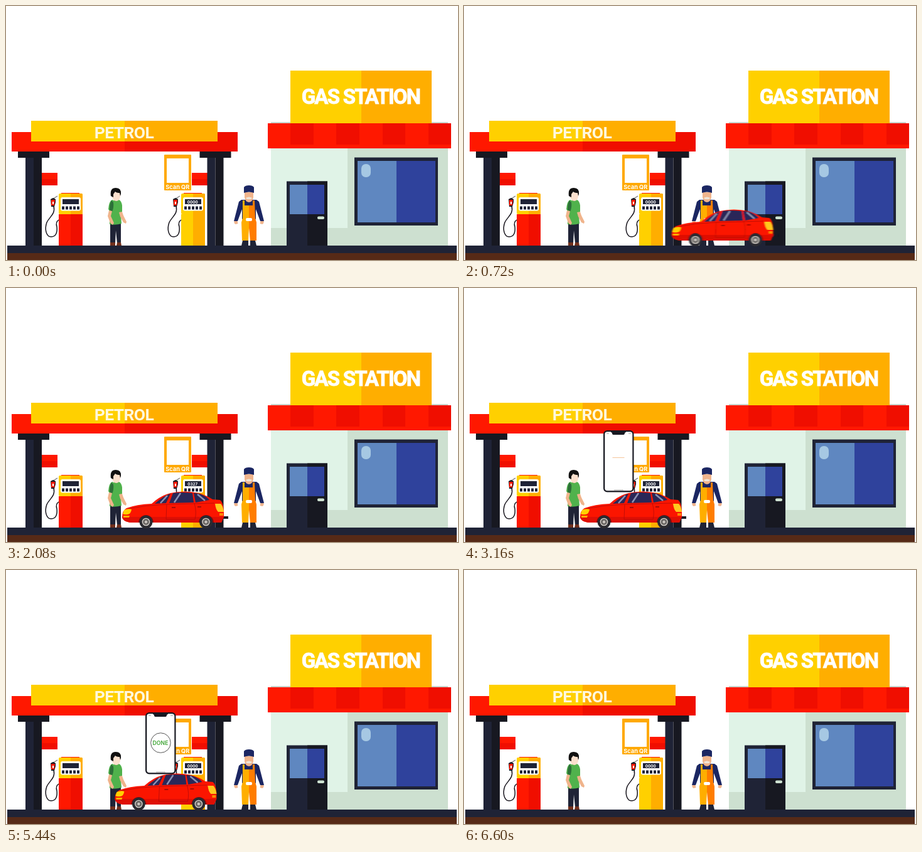
Animation of 720 by 405 pixels, one loop 7 s. Source, as an HTML page:

```html
<!DOCTYPE html>
<html lang="en">
<head>
<meta charset="utf-8">
<title>Gas station</title>
<style>
  html, body { margin: 0; width: 100%; height: 100%; overflow: hidden; background: #fff; }
  svg { display: block; width: 720px; height: 405px; }
  .y { fill: #ffd000 } .o { fill: #ffae00 } .r { fill: #ff1800 } .d { fill: #f00e00 }
  .n { fill: #1f2336 } .k { fill: #171821 } .w { fill: #fff }
  .sky { fill: #5f87c0 } .deep { fill: #2f429c } .skin { fill: #f0b48c } .navy { fill: #1b2662 }
  .sign { font-family: Roboto, sans-serif; font-weight: 700 }
  .small { font-family: Inter, sans-serif; font-weight: 700 }
</style>
</head>
<body>
<svg viewBox="0 0 720 405">
  <defs>
    <filter id="blur" filterUnits="userSpaceOnUse" x="-200" y="310" width="570" height="90">
      <feGaussianBlur id="smear" stdDeviation="0 0"/>
    </filter>

    <g id="post">
      <path class="n" d="M31 240h13v142h-13z"/>
      <path class="k" d="M19 232h50v10h-50zM44 242h13v140h-13z"/>
    </g>
    <g id="bar">
      <path class="r" d="M57 266h25v10h-25z"/>
      <path class="d" d="M57 276h25v10h-25z"/>
    </g>

    <g id="head">
      <path class="r" d="M88 298h29v3h-29z"/>
      <rect class="y" x="84" y="299" width="38" height="33" rx="2"/>
      <path class="o" d="M103 299h17q2 0 2 2v31h-19z"/>
      <rect class="w" x="87" y="305" width="32" height="21.5" rx="3"/>
      <path class="n" d="M90 308h26v8h-26z"/>
      <path d="M89 322h28" stroke="#1f2336" stroke-width="5" stroke-dasharray="4 2"/>
      <path d="M76 319C79 332 70 335 65 345C61 356 64 368 72 368C80 368 82 360 81 352C79 346 81 343 84 341" fill="none" stroke="#17141c" stroke-width="1.5"/>
      <path d="M74 308l8-5" stroke="#777" stroke-width="1.3"/>
      <path class="k" d="M71 308l4-2 4 2v5l-2 7h-5z"/>
      <path class="r" d="M72 309h6l-1 9h-5z"/>
      <path class="w" d="M74 312h2v4h-2z"/>
    </g>

    <g id="wheel">
      <circle r="10.5" fill="#2b2a30"/>
      <circle r="6.3" fill="#d8d3cd"/>
      <circle r="5" fill="#6b6765"/>
      <circle r="2.2" fill="#c9c4bf"/>
    </g>
  </defs>

  <!-- shop -->
  <path d="M422 185h282v4h-282z" fill="#c9d3cc"/>
  <path class="y" d="M453 103h113v84h-113z"/>
  <path class="o" d="M566 103h112v84h-112z"/>
  <text class="sign w" x="565" y="155.5" font-size="33" text-anchor="middle" letter-spacing="-1.8" stroke="#fff" stroke-width=".9">GAS STATION</text>
  <path d="M422 227h282v155h-282z" fill="#cde0d0"/>
  <path d="M422 227h122v127h-122z" fill="#e0f3e7"/>
  <path class="r" d="M417 187h292v40h-292z"/>
  <path class="d" d="M453 187h37v34h-37zM526 187h37v34h-37zM600 187h36v34h-36zM673 187h36v34h-36z"/>
  <path class="n" d="M447 279.5h65v102.500h-65z"/>
  <path class="k" d="M480 279.5h32v102.500h-32z"/>
  <path class="sky" d="M452 285h28v47h-28z"/>
  <path class="deep" d="M480 285h27v47h-27z"/>
  <rect x="496" y="335.5" width="11" height="4.5" rx="2" fill="#cfe3d3"/>
  <path class="n" d="M555 241.5h133v108.500h-133z"/>
  <path class="sky" d="M560 247h62v98h-62z"/>
  <path class="deep" d="M622 247h62v98h-62z"/>
  <rect x="566" y="252" width="15" height="21" rx="7" fill="#a6c8e3"/>

  <!-- canopy -->
  <use href="#bar"/>
  <use href="#bar" x="239"/>
  <use href="#post"/>
  <use href="#post" x="289.5"/>
  <path class="r" d="M9 201h180v31h-180z"/>
  <path class="d" d="M189 201h180v31h-180z"/>
  <path class="y" d="M40 183h149v33h-149z"/>
  <path class="o" d="M189 183h148v33h-148z"/>
  <text class="sign" x="188" y="210.5" font-size="26.5" text-anchor="middle" letter-spacing="-.6" fill="#fff8dc">PETROL</text>

  <!-- poster -->
  <rect x="252" y="237" width="43" height="57" rx="1" fill="#ffa900"/>
  <path class="w" d="M256 243h35v39h-35z"/>
  <text class="small w" x="273.3" y="291.5" font-size="9.2" text-anchor="middle">Scan QR</text>

  <!-- pumps -->
  <path class="r" d="M84 332h19v50h-19z"/>
  <path class="d" d="M103 332h19v50h-19z"/>
  <use href="#head"/>
  <path class="y" d="M279 332h19v50h-19z"/>
  <path class="o" d="M298 332h19v50h-19z"/>
  <use href="#head" x="195"/>
  <text id="price" class="small w" x="297.2" y="314.6" font-size="6.3" text-anchor="middle">0000</text>

  <!-- customer -->
  <path class="n" d="M166 345h17v33h-6l-2-20-1 20h-8z"/>
  <path d="M166 377h8v5h-8zM177 377h6l1 5h-8z" fill="#71301d"/>
  <path class="skin" d="M172 300h7v12h-7z"/>
  <path d="M169 309q6 3 11 0 4 2 5 9v13l-2 3 1 13q-10 3-19 1v-21l-2-3q1-13 6-15z" fill="#50b24c"/>
  <path d="M168 310l3 3q1 9-2 15l-4-3q0-11 3-15z" fill="#2c6f38"/>
  <path class="skin" d="M164 326l5 1-2 8 5 11-2 3-4-3-4-11zM180 329l5-1 2 6 5 10-1 3-4-2-5-9z"/>
  <path d="M169 297h13v7q-1 6-6 7-6-1-7-7z" fill="#fbe0cd"/>
  <path d="M167 303q-2-13 8-13 9 0 8 10l-1 3-1-5q-5 0-7-2l-3 4v5z" fill="#111"/>

  <!-- attendant -->
  <path class="navy" d="M375 309h24l4 3 8 31h-6l-7-19v16h-22v-16l-7 19h-6l8-31z"/>
  <path class="skin" d="M363.500 343h5l1 4-4 1-2-2zM410.500 343h-5l-1 4 4 1 2-2zM380 297h14v8q-1 7-7 8-6-1-7-8z"/>
  <path class="o" d="M377 310h3v8h7v36l-1 20h-10l-1-29 2-7z"/>
  <path d="M396 310h-3v8h-6v36l2 20h10v-29l-2-7z" fill="#ff7d00"/>
  <path class="n" d="M377 374h9v8h-11zM389 374h8l2 8h-10z"/>
  <path class="navy" d="M379 298v-9q2-3 8-3t8 3v9q-8-3-16 0z"/>
  <path d="M382 306q5-3 10 0-1 3-5 2-4 1-5-2z" fill="#efe6da"/>
  <rect class="w" x="382" y="338" width="10" height="5" rx="2"/>

  <!-- ground -->
  <path class="n" d="M2 382h716v12h-716z"/>
  <path d="M2 394h716v11h-716z" fill="#562a17"/>

  <g id="car">
    <path class="k" d="M158 364h10v4h-10z"/>
    <path d="M-1 365q0-10 7-14 16-6 40-7Q60 331 76 327 98 322 121 327 134 331 143 337l12 1q5 3 6 18v9l-4 9H14q-14-1-15-9z" fill="#fb1500"/>
    <path d="M-1 365h162l-4 9H14q-14-1-15-9z" fill="#df0f05"/>
    <path d="M51 344q13-12 25-16l-7 15zM74 343l6-16q15-2 31 0l2 15zM116 342l-3-15q8 0 14 3 7 3 11 8z" fill="#2a2858"/>
    <path d="M60 343l11-12M82 342l10-15M119 329l12 10" stroke="#8c93b4" stroke-width="2.5"/>
    <path d="M70 345l-1 24h46q3-12-1-26M8 352q30-6 62-7l76-2" fill="none" stroke="#b50b0a" stroke-width=".8"/>
    <path d="M78 350h6M119 349h6" stroke="#8e0808" stroke-width="1.4"/>
    <path d="M2 354q7-3 12-1-1 7-6 8-6 1-8-1z" fill="#ffd000"/>
    <path d="M1 363h10l-1 3h-9z" fill="#ffae00"/>
    <path d="M147 344h9q4 4 5 13h-9q-4-4-5-13z" fill="#ffc81e"/>
    <path d="M154 359h6v4h-6z" fill="#ff8a00"/>
    <path d="M25 374a12 12 0 0124 0zM121 374a12 12 0 0124 0z" fill="#8d0909"/>
    <use href="#wheel" x="37" y="373"/>
    <use href="#wheel" x="132.500" y="373"/>
  </g>

  <g id="phone">
    <rect class="k" x="222" y="227" width="48.5" height="98.5" rx="6"/>
    <rect class="w" x="224.3" y="229.3" width="44" height="94" rx="4"/>
    <path class="k" d="M234 229h24v1q-2 0-2 2 0 2-3 2h-14q-3 0-3-2 0-2-2-2z"/>
    <path d="M227 232h4M262 232h4" stroke="#999"/>
    <path d="M239 322h15" stroke="#aaa"/>
    <path id="scan" d="M236.5 0h19" stroke="#f5c49a"/>
    <!-- starts at the top and runs anticlockwise -->
    <circle id="ring" cx="246.4" cy="275.6" r="15.8" fill="none" stroke="#555" pathLength="1" transform="translate(492.8 0) scale(-1 1) rotate(-90 246.4 275.6)"/>
    <text id="done" class="small" x="246" y="278.8" font-size="8.7" style="font-weight:600" text-anchor="middle" fill="#3fa535">DONE</text>
  </g>
</svg>
<script>
const LOOP = 7000, STEP = 40, PARK = 186;
const $ = id => document.getElementById(id);
const clamp = v => Math.min(1, Math.max(0, v));
const span = (t, a, b) => clamp((t - a) / (b - a));

// cubic-bezier(.08, 0, 1, 0): slow start, steep finish
function ramp(s) {
  if (s <= 0 || s >= 1) return clamp(s);
  let lo = 0, hi = 1;
  for (let i = 0; i < 24; i++) {
    const q = (lo + hi) / 2, p = 1 - q;
    if (.24 * p * p * q + 3 * p * q * q + q ** 3 < s) lo = q; else hi = q;
  }
  return lo ** 3;
}

const carX = t => PARK + 800 * ramp(1 - span(t, 0, 1920)) - 360 * ramp(span(t, 5000, 6600));
const phoneY = t => 180 * ((1 - span(t, 2210, 2840)) ** 3 + span(t, 5880, 6400) ** 3);

function draw(t) {
  const x = carX(t), speed = Math.abs(carX(t - 20) - carX(t + 20));
  const car = $('car');
  car.setAttribute('transform', `translate(${x} 0)`);
  car.style.display = x < 720 && x > -170 ? '' : 'none';
  $('smear').setAttribute('stdDeviation', `${Math.min(speed * .1, 12)} 0`);
  if (speed > 3) car.setAttribute('filter', 'url(#blur)');
  else car.removeAttribute('filter');

  const price = t < 5000 ? Math.round(2000 * span(t, 1920, 2900)) : 0;
  $('price').textContent = String(price).padStart(4, '0');

  $('phone').setAttribute('transform', `translate(0 ${phoneY(t)})`);
  $('scan').setAttribute('transform', `translate(0 ${264.5 + 19 * span(t, 2940, 3640)})`);
  $('scan').style.opacity = t >= 2940 && t < 3680 ? 1 : 0;
  const arc = span(t, 4160, 4560);
  $('ring').setAttribute('stroke-dasharray', `${arc} 2`);
  $('ring').style.opacity = arc > 0 ? 1 : 0;
  $('done').style.opacity = span(t, 4380, 4560);
}

const start = performance.now();
function tick() {
  const t = (performance.now() - start) % LOOP;
  draw(Math.floor(t / STEP) * STEP);
  requestAnimationFrame(tick);
}
tick();
</script>
</body>
</html>
```
